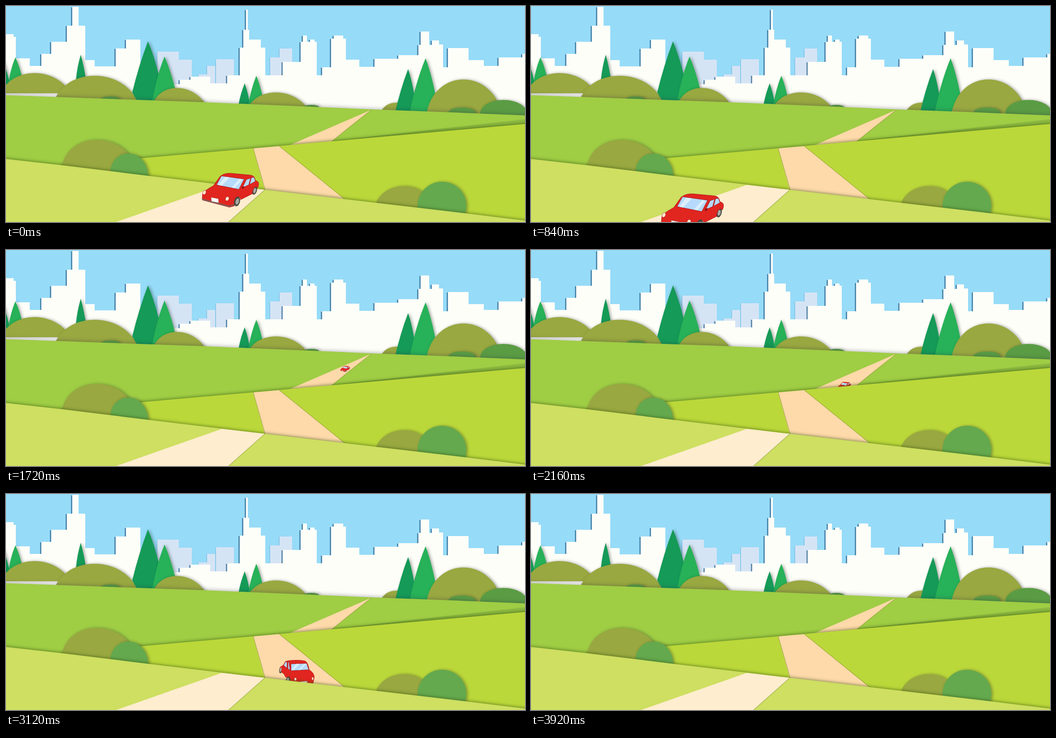
An HTML page for the animation above (3960 ms loop, 1159 px wide and 483 px high).

```html
<!DOCTYPE html>
<html lang="en">
<head>
<meta charset="utf-8">
<title>Country drive</title>
<style>
html, body { margin: 0; width: 100%; height: 100%; overflow: hidden; background: #96dbf8; }
svg { display: block; width: 1159px; height: 483px; }
.city { fill: #fefef9; filter: drop-shadow(-3px 1px .5px rgba(50, 105, 145, .7)); }
.haze { fill: #d5e4f5; filter: drop-shadow(-1px 1px 1px rgba(90, 130, 180, .4)); }
.plants > * { filter: drop-shadow(3px 0 3px rgba(40, 50, 40, .4)); }
.hill { filter: drop-shadow(0 -2px 3px rgba(45, 75, 10, .5)); }
.far { filter: drop-shadow(0 -2px 4px rgba(40, 40, 60, .3)); }
.olive { fill: #99a840; }
.dark { fill: #159a57; }
.light { fill: #27b158; }
.leaf { fill: #64a94e; }
.moss { fill: #5a9c44; }
.road { fill: #fed9aa; }
.edge { fill: none; stroke: #82942f; stroke-width: 1.5; opacity: .55; }
.red { fill: #e1251f; stroke: #a3161a; stroke-width: .8; stroke-linejoin: round; }
.glass { fill: #b5dafb; stroke: #9c1a20; stroke-width: .8; }
.shine { fill: #dceefd; }
.tyre { fill: #49463f; }
.rim { fill: #a9aaa2; }
.lamp { fill: #fde6cd; stroke: #a3161a; stroke-width: .6; }
.plate { fill: #fffaf4; stroke: #777; stroke-width: .5; }
.bumper { fill: none; stroke: #75605c; stroke-width: 2.5; }
.mirror { fill: #8f1518; }
</style>
</head>
<body>
<svg viewBox="0 0 1159 483">
  <defs>
    <linearGradient id="shade" x1="0" y1="0" x2="0" y2="1">
      <stop offset="0" stop-color="#8fbd41"/>
      <stop offset="1" stop-color="#7fa838"/>
    </linearGradient>
    <g id="left">
      <ellipse class="tyre" cx="118" cy="38" rx="5.5" ry="10" transform="rotate(14 118 38)"/>
      <path class="red" d="M 1 57 L 2 46 C 8 38 15 34 26 28 L 41 7 C 50 0 57 0 65 0 L 108 4 C 116 5 118 8 120 16 C 126 18 128 20 127 27 L 125 33 C 122 28 114 30 113 46 L 87 59 C 86 49 74 50 73 73 L 62 76 L 2 60 Z"/>
      <polyline class="bumper" points="1,58 61,74 73,70"/>
      <polygon class="glass" points="44,6 95,13 83,36 33,26"/>
      <polygon class="shine" points="52,8 63,9 45,28 37,26"/>
      <polygon class="shine" points="84,13 91,14 74,33 67,32"/>
      <polygon class="glass" points="100,14 109,11 105,26 91,32"/>
      <polygon class="glass" points="111,10 117,9 120,18 107,25"/>
      <polygon class="mirror" points="90,30 95,29 94,34 89,35"/>
      <ellipse class="tyre" cx="79" cy="63" rx="6.5" ry="11" transform="rotate(14 79 63)"/>
      <ellipse class="rim" cx="79.5" cy="63" rx="3.8" ry="7" transform="rotate(14 79 63)"/>
      <ellipse class="rim" cx="118.5" cy="38.5" rx="3" ry="6" transform="rotate(14 118 38)"/>
      <ellipse class="lamp" cx="6" cy="43" rx="3.5" ry="5" transform="rotate(25 6 43)"/>
      <ellipse class="lamp" cx="57" cy="57" rx="3.8" ry="5" transform="rotate(25 57 57)"/>
      <polygon class="plate" points="21,54 37,57 38,66 22,63"/>
    </g>
    <g id="right">
      <ellipse class="tyre" cx="3.5" cy="20" rx="3.3" ry="7" transform="rotate(12 3 20)"/>
      <path class="red" d="M 2 15 L 9 10 L 13 3 C 20 0 45 0 52 2 C 57 4 59 10 61 20 C 68 25 72 30 71 37 L 68 51 L 24 53 L 20 36 L 13 35 L 10 29 L 5 25 Z"/>
      <polyline class="bumper" points="23,53 45,52.5 69,49.5"/>
      <polygon class="glass" points="24,8 56,7 60,20 24,22"/>
      <polygon class="shine" points="34,8 42,8 29,21 25,21"/>
      <polygon class="shine" points="51,8 55,8 44,20 39,21"/>
      <polygon class="glass" points="9,11 13,4 16,4 16,17"/>
      <polygon class="glass" points="18,4 20,5 22,21 18,18"/>
      <ellipse class="tyre" cx="18" cy="42" rx="4.6" ry="8.3" transform="rotate(10 18 42)"/>
      <ellipse class="rim" cx="17.5" cy="42" rx="2.7" ry="5.5" transform="rotate(10 18 42)"/>
      <ellipse class="rim" cx="3" cy="20" rx="1.8" ry="4.5" transform="rotate(12 3 20)"/>
      <ellipse class="lamp" cx="33" cy="39" rx="2.4" ry="3.2"/>
      <ellipse class="lamp" cx="68" cy="38" rx="2" ry="3.2"/>
      <polygon class="plate" points="43,44 57,43 56,49 42,50"/>
    </g>
  </defs>

  <rect width="1159" height="483" fill="#96dbf8"/>
  <g class="haze">
    <rect x="338" y="102" width="48" height="80"/>
    <rect x="386" y="120" width="29" height="60"/>
    <rect x="430" y="153" width="20" height="25"/>
    <rect x="449" y="134" width="18" height="45"/>
    <rect x="469" y="119" width="40" height="60"/>
    <rect x="590" y="115" width="22" height="50"/>
    <rect x="611" y="95" width="28" height="65"/>
  </g>
  <path class="city" id="city"/>

  <g class="plants">
    <path class="dark" d="M -8 120 Q 5 150 9 180 H -8 Z"/>
    <path class="light" d="M 21 115 Q 10 140 4 180 H 40 Q 33 140 21 115 Z"/>
    <path class="olive" d="M -12 195 C 15 135 110 135 145 195 Z"/>
    <path class="dark" d="M 167 109 Q 159 135 156 167 H 179 Q 174 135 167 109 Z"/>
    <path class="olive" d="M 110 207 C 140 138 260 138 294 214 Z"/>
    <ellipse class="moss" cx="233" cy="210" rx="22" ry="8"/>
    <path class="dark" d="M 317 79 Q 296 135 282 193 L 294 214 H 354 Q 340 135 317 79 Z"/>
    <path class="light" d="M 354 113 Q 337 155 326 214 H 384 Q 372 155 354 113 Z"/>
    <path class="olive" d="M 330 214 C 350 172 415 172 446 220 Z"/>
    <path class="dark" d="M 533 173 Q 524 195 519 222 H 545 Q 541 195 533 173 Z"/>
    <path class="light" d="M 559 156 Q 547 185 541 222 H 577 Q 569 180 559 156 Z"/>
    <path class="olive" d="M 545 220 C 570 183 640 183 673 228 Z"/>
    <ellipse class="moss" cx="682" cy="226" rx="17" ry="5"/>
    <path class="olive" d="M 837 236 C 850 215 865 216 885 216 V 240 Z"/>
    <path class="dark" d="M 898 141 Q 881 185 869 238 H 917 Q 911 180 898 141 Z"/>
    <path class="light" d="M 937 117 Q 915 170 901 240 H 966 Q 955 165 937 117 Z"/>
    <path class="olive" d="M 939 240 C 958 141 1075 141 1104 228 V 245 Z"/>
    <ellipse class="moss" cx="1018" cy="238" rx="30" ry="11"/>
    <ellipse class="moss" cx="1111" cy="240" rx="52" ry="30"/>
  </g>

  <polygon class="far" fill="#9fcd44" points="-9,199 440,215 700,226 815,231 1000,238 1168,245 1168,490 -9,490"/>
  <polygon fill="url(#shade)" points="727,302 1159,253 1159,266 720,306"/>
  <path class="road" d="M 816 232 L 634 311 L 726 304 Q 770 268 816 232 Z"/>
  <path class="edge" d="M 816 232 Q 770 268 726 304"/>
  <use id="carB" href="#left"/>

  <polygon class="hill" fill="#bbd83a" points="125,356 305,340 610,313 1168,263 1168,490 125,490"/>
  <polygon class="road" points="552,318.5 610,313.5 762,437 579,416"/>
  <path class="edge" d="M 552 318 L 579 412 M 610 313 L 758 433"/>
  <g class="plants">
    <path class="olive" d="M 125 357 C 140 285 240 285 274 332 L 260 380 Z"/>
    <path class="leaf" d="M 233 375 C 232 314 318 313 318 385 Z"/>
    <path class="olive" d="M 825 445 C 840 394 915 394 932 420 V 460 Z"/>
    <ellipse class="leaf" cx="973.5" cy="447" rx="54.5" ry="54"/>
  </g>
  <use id="carC" href="#right"/>

  <polygon class="hill" fill="#cedf61" points="-9,341 125,356 320,380 578,411 758,432 1030,464 1168,481 1168,495 -9,495"/>
  <polygon fill="#feedcf" points="482,400 578,411 497,483 246,483"/>
  <path class="edge" d="M 578 411 L 497 483"/>
  <use id="carA" href="#left"/>
</svg>
<script>
const LOOP = 3960, STEP = 40;

// Roof line: each pair is where a roof starts and its height on the stage
const west = [
  [-5, 63], [17, 69], [22, 117], [53, 134], [79, 107], [101, 80], [136, 44],
  [148, 2], [162, 44], [177, 121], [198, 135], [245, 95], [268, 75], [300, 175],
  [388, 165], [412, 158], [456, 173], [494, 155], [522, 93], [530, 53],
  [536, 8], [540, 53], [543, 75], [569, 93], [579, 155]
];
const east = [
  [618, 125], [658, 80], [663, 66], [672, 80], [679, 75], [689, 80], [694, 155],
  [706, 137], [726, 73], [732, 66], [753, 73], [759, 120], [789, 136], [823, 118],
  [876, 110], [921, 87], [926, 57], [945, 87], [951, 77], [967, 86], [976, 137],
  [987, 94], [1033, 121], [1067, 134], [1100, 115], [1153, 107]
];
const roofs = [...west, ...east].map(([x, y]) => `H ${x} V ${y}`).join(" ");
document.getElementById("city").setAttribute("d", `M -5 250 ${roofs} H 1165 V 250 Z`);

// Each leg accelerates from rest: pose = start + change * (elapsed / unit)^2
const legs = [
  { id: "carA", from: 0, to: 1360, unit: 840, start: [437, 374, 1], change: [-147, 46, 0.1] },
  { id: "carB", from: 1160, to: 2360, unit: 1000, start: [774.6, 243, 0.141], change: [-90.1, 52, 0.093] },
  { id: "carC", from: 2320, to: 3520, unit: 800, start: [564.7, 304.3, 0.967], change: [45.3, 66.7, 0.133] }
];
for (const leg of legs) leg.el = document.getElementById(leg.id);

function draw(time) {
  for (const { el, from, to, unit, start, change } of legs) {
    const shown = time >= from && time < to;
    el.style.display = shown ? "" : "none";
    if (!shown) continue;
    const q = ((time - from) / unit) ** 2;
    const [x, y, s] = start.map((v, i) => v + change[i] * q);
    el.setAttribute("transform", `translate(${x} ${y}) scale(${s})`);
  }
}

let begin;
function tick(now) {
  begin ??= now;
  draw(Math.floor(((now - begin) % LOOP) / STEP) * STEP);
  requestAnimationFrame(tick);
}
draw(0);
requestAnimationFrame(tick);
</script>
</body>
</html>
```
